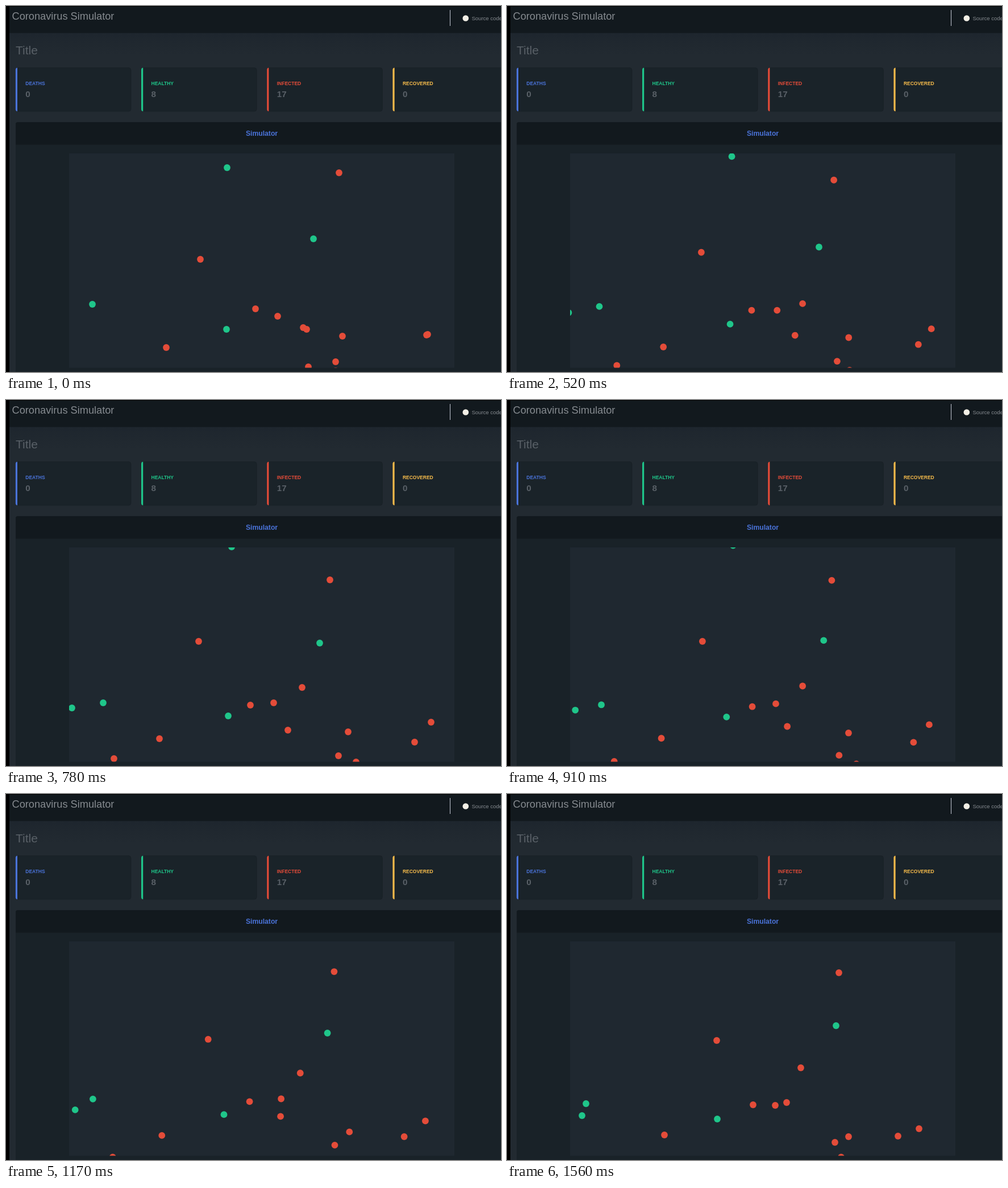
An HTML page that plays this animation: 871 by 643 pixels, repeating every 1690 ms.

```html
<!DOCTYPE html>
<html lang="en">
<head>
<meta charset="utf-8">
<title>Coronavirus Simulator</title>
<style>
  html, body { margin: 0; width: 100%; height: 100%; overflow: hidden; background: #000; }
  svg { display: block; width: 871px; height: 643px; font-family: "Liberation Sans", Arial, sans-serif; }
  .label { font-size: 8.5px; font-weight: bold; }
  .count { font-size: 15.2px; font-weight: bold; fill: #596067; }
</style>
</head>
<body>
<svg viewBox="0 0 871 643">
  <defs>
    <clipPath id="arena"><rect x="111" y="259" width="678" height="376.5"/></clipPath>
    <linearGradient id="shade" x2="0" y2="1">
      <stop stop-color="#1e262e"/><stop offset="1" stop-color="#222a31"/>
    </linearGradient>
  </defs>
  <rect x="6" y="1" width="865" height="642" fill="#222a31"/>
  <rect x="6" y="47" width="865" height="40" fill="url(#shade)"/>
  <rect x="6" y="1" width="865" height="46.5" fill="#12191e"/>
  <text x="10.5" y="24" font-size="18.2" fill="#868b90">Coronavirus Simulator</text>
  <path d="M781.5 7V35" stroke="#c5c9d6"/>
  <circle cx="808.8" cy="21.5" r="5.3" fill="#f3efe6"/>
  <text x="819.5" y="25" font-size="9.5" fill="#868b90">Source code</text>
  <text x="17" y="85" font-size="21" fill="#596067">Title</text>
  <g id="cards"></g>
  <path d="M17 643V208a4 4 0 0 1 4-4H871V643Z" fill="#192228"/>
  <path d="M17 243V208a4 4 0 0 1 4-4H871V243Z" fill="#12191e"/>
  <path d="M17 243.5H871" stroke="#151c21"/>
  <text x="450" y="227.6" font-size="12.2" font-weight="bold" text-anchor="middle" fill="#4a73d9">Simulator</text>
  <rect x="111" y="259" width="678" height="376.5" fill="#1f2830"/>
  <g id="dots" clip-path="url(#arena)"></g>
</svg>
<script>
const STEP = 130, STEPS = 13, LEG = 6, WANDER = 3;
const RED = '#e44c39', GREEN = '#1fc68a', BLUE = '#4a73d9', YELLOW = '#f6bb4b';

function add(parent, tag, attrs, text = '') {
  const node = document.createElementNS('http://www.w3.org/2000/svg', tag);
  for (const name in attrs) node.setAttribute(name, attrs[name]);
  node.textContent = text;
  return document.getElementById(parent).appendChild(node);
}

[['DEATHS', 0, BLUE], ['HEALTHY', 8, GREEN], ['INFECTED', 17, RED], ['RECOVERED', 0, YELLOW]]
  .forEach(([label, count, color], i) => {
    const x = 16.8 + i * 221.2;
    add('cards', 'rect', { x: x + .5, y: 108.5, width: 202.5, height: 76.5, rx: 4, fill: '#1a2329', stroke: '#182026' });
    add('cards', 'path', { d: `M${x + 3.2} 108.5V185a3.2 4 0 0 1-3.2-4V112.5a3.2 4 0 0 1 3.2-4Z`, fill: color });
    add('cards', 'text', { x: x + 17.5, y: 139, class: 'label', fill: color }, label);
    add('cards', 'text', { x: x + 17.5, y: 159.5, class: 'count' }, count);
  });

// Each person heads for a turning point, then for an end point, wandering a little on the way.
const people = [];
function person(fill, start, turn, end) {
  people.push({ route: [start, turn, end], node: add('dots', 'circle', { r: 5.9, fill }) });
}

person(GREEN, [389, 284], [397, 258], [410, 240]);
person(GREEN, [541, 409], [552, 427], [579, 407]);
person(GREEN, [152, 524], [171, 532], [139, 544]);
person(GREEN, [388, 568], [391, 555], [370, 571]);
person(GREEN, [98, 528], [116, 541], [132, 565]);
person(RED, [586, 293], [570, 316], [584, 314]);
person(RED, [342, 445], [339, 424], [369, 433]);
person(RED, [439, 532], [430, 536], [433, 546]);
person(RED, [478, 545], [471, 532], [492, 542]);
person(RED, [529, 568], [496, 580], [472, 547]);
person(RED, [523, 565], [521, 505], [517, 481]);
person(RED, [592, 580], [602, 583], [601, 602]);
person(RED, [740, 578], [719, 601], [688, 601]);
person(RED, [742, 577], [748, 566], [725, 588]);
person(RED, [282, 600], [270, 595], [277, 599]);
person(RED, [580, 625], [585, 625], [577, 612]);
person(RED, [532, 634], [570, 650], [588, 638]);
person(RED, [580, 641], [616, 636], [600, 660]);
person(RED, [202, 642], [190, 630], [186, 652]);

function draw(now) {
  const step = Math.floor(now / STEP) % STEPS;
  const leg = step < LEG ? 0 : 1;
  const part = step / LEG - leg;
  const drift = WANDER * Math.sin(part * Math.PI);
  people.forEach(({ route, node }, i) => {
    const [[x0, y0], [x1, y1]] = route.slice(leg);
    const heading = i * 2.4 + step * 1.3;
    node.setAttribute('cx', x0 + (x1 - x0) * part + drift * Math.cos(heading));
    node.setAttribute('cy', y0 + (y1 - y0) * part + drift * Math.sin(heading));
  });
}

const start = performance.now();
(function tick() {
  draw(performance.now() - start);
  requestAnimationFrame(tick);
})();
</script>
</body>
</html>
```
